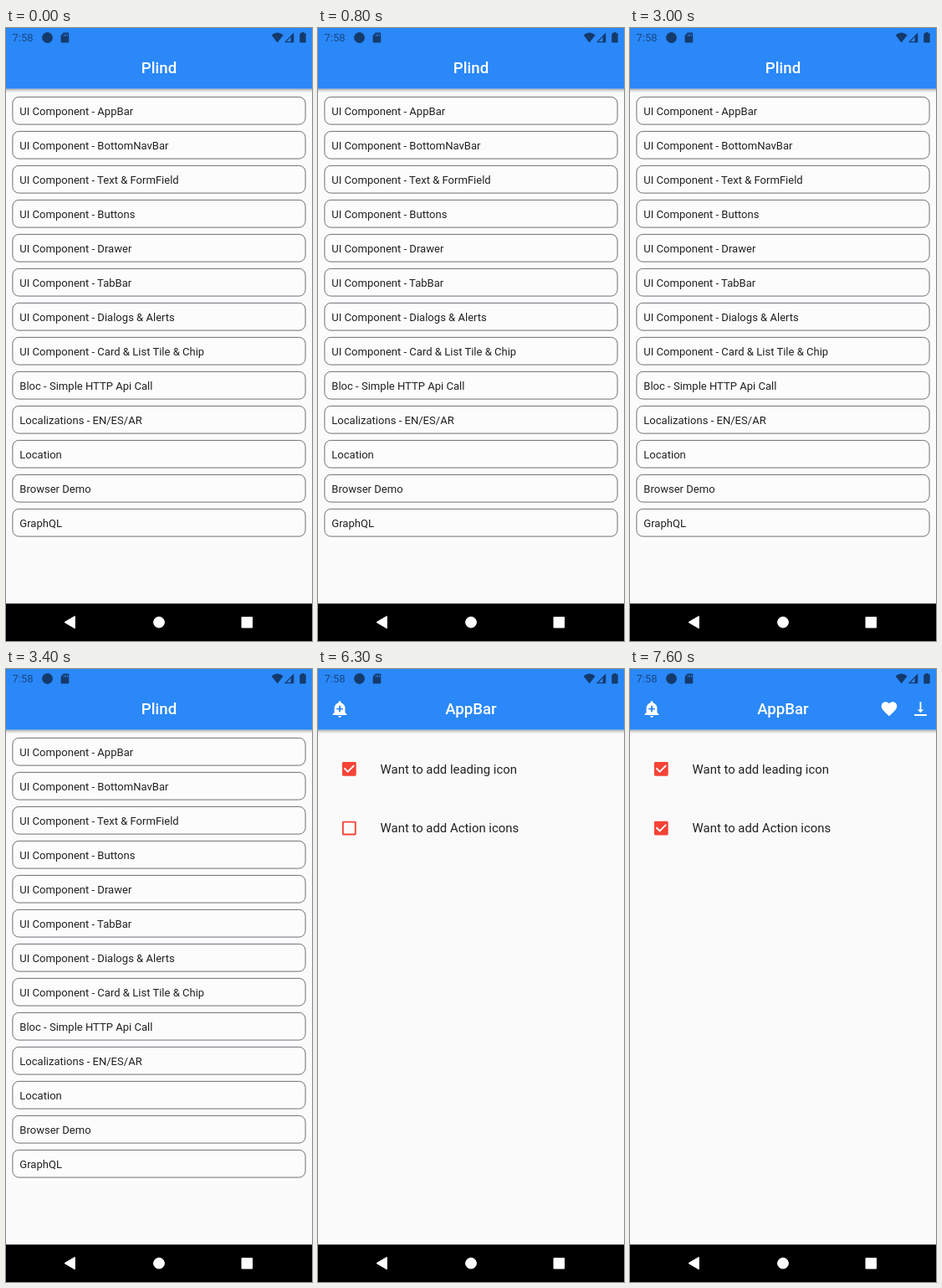
Recreate the animation shown at these times as an HTML page. Size 366 by 732 pixels, loop 8 s.

```html
<!DOCTYPE html>
<html lang="en">
<head>
<meta charset="utf-8">
<title>App demo</title>
<style>
  html, body { margin: 0; width: 100%; height: 100%; overflow: hidden; background: #000; }
  svg { display: block; width: 100%; height: 100%; font-family: Roboto, "Noto Sans", sans-serif; }
  .item { font-size: 13.05px; fill: #212121; }
  .option { font-size: 14.9px; fill: #212121; }
  .title { font-size: 18.64px; font-weight: 500; fill: #fff; text-anchor: middle; }
  .card { fill: #fcfcfd; stroke: #706e76; stroke-width: 1; }
  .clock { font-size: 13px; fill: #1a4885; }
</style>
</head>
<body>
<svg viewBox="0 0 366 732" xmlns="http://www.w3.org/2000/svg">
  <defs>
    <linearGradient id="shade" x1="0" y1="0" x2="0" y2="1">
      <stop offset="0" stop-color="#000" stop-opacity=".36"/>
      <stop offset=".4" stop-color="#000" stop-opacity=".14"/>
      <stop offset="1" stop-color="#000" stop-opacity="0"/>
    </linearGradient>
  </defs>

  <rect width="366" height="732" fill="#fbfbfb"/>
  <g id="list"></g>
  <g id="options"></g>

  <rect y="72.5" width="366" height="5" fill="url(#shade)"/>
  <rect width="366" height="72.5" fill="#2a88f8"/>
  <text id="title" class="title" x="183" y="54.3"></text>
  <g id="icons" fill="#fff"></g>

  <!-- status bar -->
  <text class="clock" x="7.5" y="16.4">7:58</text>
  <g fill="#153a6b">
    <circle cx="49.5" cy="11.5" r="6.4"/>
    <path d="M68.8 5.6H74a1.2 1.2 0 0 1 1.2 1.2v9.5a1.2 1.2 0 0 1-1.2 1.2h-7.2a1.2 1.2 0 0 1-1.2-1.2V9z"/>
    <path d="M324.6 17.4L317.6 8.4Q324.6 2.8 331.6 8.4z"/>
    <path d="M344.3 5.6V17.2H332.8zM340.6 10.8L335.7 15.9H340.6z" fill-rule="evenodd"/>
    <path d="M353.5 5h3v1.2h1.3a.9.9 0 0 1 .9.9v9.5a.9.9 0 0 1-.9.9h-5.6a.9.9 0 0 1-.9-.9V7.100a.9.9 0 0 1 .9-.9h1.300z"/>
  </g>
  <path d="M69.500 7.300v2.600M71.500 7.300v2.600M73.500 7.300v2.600" stroke="#2a88f8" stroke-width=".9"/>

  <!-- navigation bar -->
  <rect y="687.3" width="366" height="44.700" fill="#000"/>
  <g fill="#fff" stroke="#fff" stroke-linejoin="round">
    <path d="M70 709.600L82.300 702.400V716.800z"/>
    <circle cx="183" cy="709.600" r="6.400"/>
    <rect x="282" y="703.500" width="12.500" height="12.500"/>
  </g>
</svg>
<script>
const LOOP = 8000;
const RED = '#f44336';
const ITEMS = [
  'UI Component - AppBar', 'UI Component - BottomNavBar', 'UI Component - Text & FormField',
  'UI Component - Buttons', 'UI Component - Drawer', 'UI Component - TabBar',
  'UI Component - Dialogs & Alerts', 'UI Component - Card & List Tile & Chip',
  'Bloc - Simple HTTP Api Call', 'Localizations - EN/ES/AR', 'Location', 'Browser Demo', 'GraphQL'
];
const GLYPHS = {
  back: 'M20 11H7.83l5.59-5.59L12 4l-8 8 8 8 1.41-1.41L7.83 13H20v-2z',
  bell: 'M10.01 21.01c0 1.1.89 1.99 1.99 1.99s1.99-.89 1.99-1.99h-3.98zm8.87-4.19V11c0-3.25-2.25-5.97-5.29-6.69v-.72C13.59 2.71 12.88 2 12 2s-1.59.71-1.59 1.59v.72C7.37 5.03 5.12 7.75 5.12 11v5.82L3 18.94V20h18v-1.06l-2.12-2.12zM16 13.01h-3v3h-2v-3H8V11h3V8h2v3h3v2.01z',
  heart: 'M12 21.35l-1.45-1.32C5.4 15.36 2 12.28 2 8.5 2 5.42 4.42 3 7.5 3c1.74 0 3.41.81 4.5 2.09C13.09 3.81 14.76 3 16.5 3 19.58 3 22 5.42 22 8.5c0 3.78-3.4 6.86-8.55 11.54L12 21.35z',
  down: 'M16 13h-3V3h-2v10H8l4 4 4-4zM4 19v2h16v-2H4z'
};

const byId = id => document.getElementById(id);
const list = byId('list'), options = byId('options'), icons = byId('icons'), title = byId('title');

function add(parent, tag, attrs, text) {
  const el = document.createElementNS('http://www.w3.org/2000/svg', tag);
  for (const key in attrs) el.setAttribute(key, attrs[key]);
  if (text) el.textContent = text;
  return parent.appendChild(el);
}

function show(el, on) {
  el.setAttribute('visibility', on ? 'visible' : 'hidden');
}

// 24-unit glyph centred on the toolbar line
function icon(name, x) {
  return add(icons, 'path', {
    d: GLYPHS[name], transform: `translate(${x} 47.6) scale(.932) translate(-12 -12)`
  });
}

function option(label, y, ripple) {
  const wave = add(options, 'circle', { ...ripple, fill: RED, 'fill-opacity': .12 });
  const box = add(options, 'g', { transform: `translate(37.3 ${y}) scale(.932) translate(-9 -9)` });
  const frame = add(box, 'rect', {
    x: 1, y: 1, width: 16, height: 16, rx: .6, stroke: RED, 'stroke-width': 2
  });
  const tick = add(box, 'path', {
    d: 'M2.7 8.1L7.2 12.6L15.3 4.5', fill: 'none', stroke: '#fff', 'stroke-width': 2
  });
  add(options, 'text', { class: 'option', x: 74.6, y: y + 5.2 }, label);
  return (checked, pressed) => {
    frame.setAttribute('fill', checked ? RED : 'none');
    tick.setAttribute('stroke-opacity', checked ? 1 : 0);
    wave.setAttribute('fill-opacity', pressed ? .12 : 0);
  };
}

ITEMS.forEach((label, i) => {
  const y = 82.4 + 41 * i;
  add(list, 'rect', { class: 'card', x: 7.9, y, width: 350.2, height: 32.7, rx: 7.5 });
  add(list, 'text', { class: 'item', x: 16.3, y: y + 21.2 }, label);
});

add(options, 'rect', { y: 72.5, width: 366, height: 615, fill: '#fafafa' });
const setLeading = option('Want to add leading icon', 119.3, { cx: 33.5, cy: 122.5, r: 11.5 });
const setActions = option('Want to add Action icons', 190.1, { cx: 37.5, cy: 189.6, r: 16.5 });

const back = icon('back', 26), bell = icon('bell', 26);
const actions = [icon('heart', 310), icon('down', 347.5)];

function draw(t) {
  const opened = t >= 5700, leading = t >= 6300, action = t >= 7500;
  show(list, !opened);
  show(options, opened);
  title.textContent = opened ? 'AppBar' : 'Plind';
  show(back, opened && !leading);
  show(bell, leading);
  actions.forEach(el => show(el, action));
  setLeading(leading, t >= 6000 && t < 6100);
  setActions(action, t >= 7200 && t < 7500);
}

const start = performance.now();
function tick() {
  draw((performance.now() - start) % LOOP);
  requestAnimationFrame(tick);
}
draw(0);
requestAnimationFrame(tick);
</script>
</body>
</html>
```
